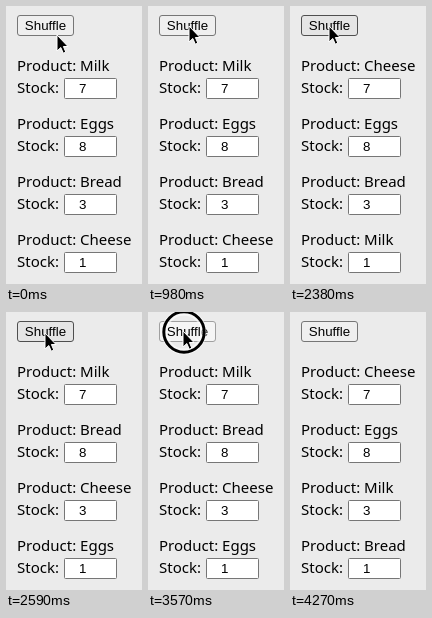
An HTML page for the animation above (5110 ms loop, 136 by 278 pixels).

```html
<!DOCTYPE html>
<html lang="en">
<head>
<meta charset="utf-8">
<title>Shuffle</title>
<style>
  html, body { margin: 0; width: 100%; height: 100%; overflow: hidden; background: #ebebeb; }
  svg { display: block; }
  .label { font: 15px "Noto Sans", "Open Sans", sans-serif; }
  .control { font: 13.333px "Liberation Sans", Arial, sans-serif; }
</style>
</head>
<body>
<svg id="stage" width="136" height="278" viewBox="0 0 136 278">
  <rect id="button" x="11.5" y="9.5" width="56" height="20" rx="2.5"/>
  <text class="control" x="39.5" y="24" text-anchor="middle">Shuffle</text>
  <g id="rows"></g>
  <rect id="caret" x="80" y="75" width="1" height="15"/>
  <g id="pointer">
    <g id="ring" fill="none">
      <circle cx="1" cy="1" r="19.5" stroke="#fff" stroke-opacity=".6" stroke-width="6"/>
      <circle cx="1" cy="1" r="20.2" stroke="#000" stroke-width="3"/>
    </g>
    <path d="M0 0V16L3.8 12.5L6.3 18.2L8.8 17.1L6.4 11.5H11Z"
          stroke="#fff" stroke-width="1" stroke-linejoin="round"/>
  </g>
</svg>
<script>
const LOOP = 5110, STEP = 70;
const $ = id => document.getElementById(id);

// Each entry holds from its time until the next one.
const orders = [
  [0, ["Milk", "Eggs", "Bread", "Cheese"]],
  [1610, ["Cheese", "Eggs", "Bread", "Milk"]],
  [2590, ["Milk", "Bread", "Cheese", "Eggs"]],
  [3640, ["Cheese", "Eggs", "Milk", "Bread"]]
];
const pointerPath = [
  [0, [51, 29]], [70, [48, 32]], [210, [45, 27]], [280, [41, 20]],
  [2380, [39, 20]], [2450, [39, 21]],
  [3080, [37, 20]], [3150, [35, 19]],
  [3990, [32, 19]], [4060, [26, 19]], [4130, [18, 19]], [4200, [-30, 19]]
];
const clicks = [420, 1540, 2520, 3570];

const at = (track, t) => track.findLast(([start]) => start <= t)[1];
const within = (t, from, to) => t >= from && t < to;
const show = (id, on) => $(id).setAttribute("visibility", on ? "visible" : "hidden");

$("rows").innerHTML = [7, 8, 3, 1].map((stock, i) => `
  <g transform="translate(0 ${58 * i})">
    <text class="label product" x="11" y="65"></text>
    <text class="label" x="11" y="87">Stock:</text>
    <rect x="58.5" y="72.5" width="52" height="20" rx="1" fill="#fff" stroke="#767676"/>
    <text class="control" x="73" y="87">${stock}</text>
  </g>`).join("");
const products = document.querySelectorAll(".product");

function draw(t) {
  const pressed = clicks.some(c => within(t, c, c + STEP));
  const hovered = within(t, 1610, 4200);
  const [fill, stroke] = pressed ? ["#f5f5f5", "#a0a0a0"]
    : hovered ? ["#e5e5e5", "#4f4f4f"] : ["#efefef", "#767676"];
  $("button").setAttribute("fill", fill);
  $("button").setAttribute("stroke", stroke);

  const order = at(orders, t);
  products.forEach((el, i) => { el.textContent = `Product: ${order[i]}`; });

  $("pointer").setAttribute("transform", `translate(${at(pointerPath, t)})`);
  show("ring", pressed);
  show("caret", within(t, 490, 980));
}

const origin = performance.now();
function tick() {
  draw((performance.now() - origin) % LOOP);
  requestAnimationFrame(tick);
}
tick();
</script>
</body>
</html>
```
